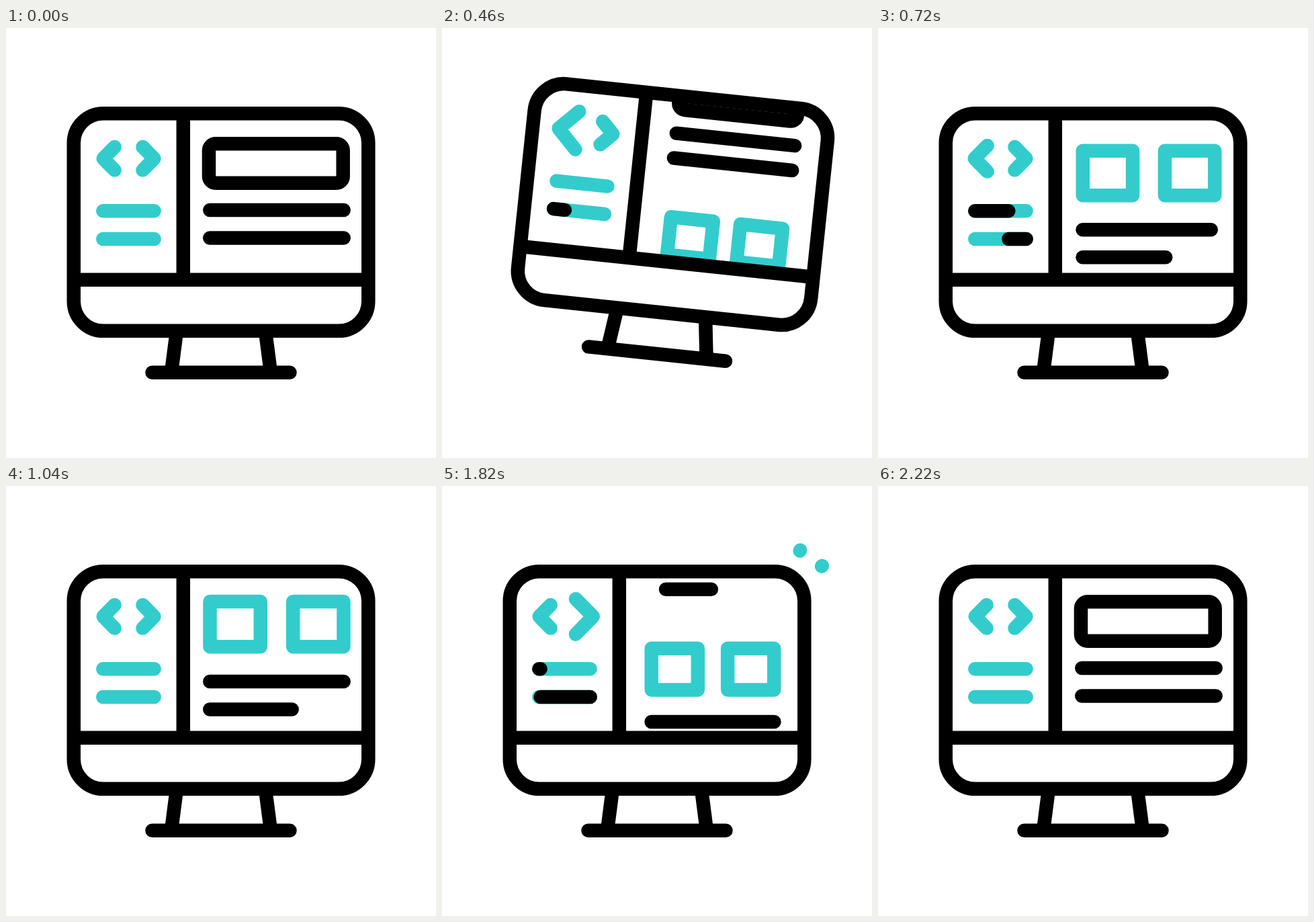
Write an HTML page with a canvas that moves like this. It is 640x640 px and loops after 2.4 s.

```html
<!DOCTYPE html>
<html lang="en">
<head>
<meta charset="utf-8">
<style>
  html, body { margin: 0; width: 100%; height: 100%; overflow: hidden; background: #fff; }
  canvas { display: block; width: 100vw; height: 100vh; object-fit: contain; }
</style>
</head>
<body>
<canvas width="640" height="640"></canvas>
<script>
const ctx = document.querySelector('canvas').getContext('2d');
const LOOP = 2400, BLACK = '#000', TEAL = '#33cccc';

const mix = (a, b, k) => a + (b - a) * k;

// Smooth step from 0 to 1 between two times
function ease(t, from, to) {
  const u = Math.min(1, Math.max(0, (t - from) / (to - from)));
  return u * u * (3 - 2 * u);
}

// Rise to 1 in the middle of the interval, then back to 0
function pulse(t, from, to) {
  const mid = (from + to) / 2;
  return ease(t, from, mid) - ease(t, mid, to);
}

function stroke(color, points, closed) {
  ctx.strokeStyle = color;
  ctx.beginPath();
  points.forEach(([x, y]) => ctx.lineTo(x, y));
  if (closed) ctx.closePath();
  ctx.stroke();
}

function roundRect(x, y, w, h, r) {
  ctx.strokeStyle = BLACK;
  ctx.beginPath();
  ctx.roundRect(x, y, w, h, r);
  ctx.stroke();
}

// Part of a line that grows from its start, then leaves through its end
function sweep(t, start, color, [x1, y1], [x2, y2]) {
  if (t <= start || t >= start + 400) return;
  const at = k => [mix(x1, x2, k), mix(y1, y2, k)];
  stroke(color, [at(ease(t, start + 200, start + 400)), at(ease(t, start, start + 200))]);
}

function bar(t, y, starts) {
  stroke(TEAL, [[144.3, y], [220.7, y]]);
  starts.forEach(s => sweep(t, s, BLACK, [144.3, y], [220.7, y]));
}

function chevron(cx, dir, k) {
  const x = d => cx + dir * d * k, h = 17.3 * k;
  stroke(TEAL, [[x(-8.7), 194.3 - h], [x(8.3), 194.3], [x(-8.7), 194.3 + h]]);
}

// Both pages shrink with distance while their strokes keep their width
function page(offset, cy) {
  const s = 1 - Math.abs(offset) / 765;
  return [x => 403 + (x - 403) * s, y => cy + offset + (y - cy) * s];
}

function articlePage(t, scroll) {
  const [X, Y] = page(-210 * scroll, 242);
  const grown = t < 1600 ? 1 : ease(t, 1600, 2050);
  const left = X(302), top = Y(172.2);
  roundRect(left, top, X(501.7) - left, Y(230.8) - top, 10);
  stroke(BLACK, [[X(303.3), Y(271)], [X(502.7), Y(271)]]);
  const from = mix(303.3, 502.7, 0.13 * (1 - grown));
  stroke(BLACK, [[X(from), Y(312.6)], [X(mix(303.3, 502.7, grown)), Y(312.6)]]);
}

function cardsPage(t, scroll) {
  const [X, Y] = page(206 * (1 - scroll), 252);
  const wobble = pulse(t, 640, 1040);
  for (const [a, b] of [[303.5, 378.8], [427.2, 502.5]]) {
    stroke(TEAL, [[X(a), Y(172)], [X(b), Y(172)], [X(b), Y(239.3)], [X(a), Y(239.3)]], true);
  }
  stroke(BLACK, [[X(303.3), Y(291)], [X(502.7 - 16 * wobble), Y(291)]]);
  stroke(BLACK, [[X(303.3), Y(332.6)], [X(425.7 + 8 * wobble), Y(332.6)]]);
}

function draw(t) {
  ctx.fillStyle = '#fff';
  ctx.fillRect(0, 0, 640, 640);
  ctx.lineWidth = 20.5;
  ctx.lineCap = ctx.lineJoin = 'round';
  ctx.save();

  const hop = pulse(t, 200, 600);
  ctx.translate(320, 513 - 35.6 * hop);
  ctx.rotate(7.7 * hop * Math.PI / 180);
  ctx.translate(-320, -513);

  const scroll = ease(t, 200, 800) - ease(t, 1600, 2200);
  ctx.save();
  ctx.beginPath();
  ctx.rect(264, 127, 275, 248);
  ctx.clip();
  if (scroll < 1) articlePage(t, scroll);
  if (scroll > 0) cardsPage(t, scroll);
  ctx.restore();

  chevron(153, -1, 1 + 0.67 * pulse(t, 200, 800));
  chevron(212.2, 1, 1 + 0.63 * pulse(t, 1600, 2200));
  bar(t, 272.3, [600, 1800]);
  bar(t, 314, [400, 1600]);

  // Monitor
  roundRect(100.8, 127.2, 438.5, 323.6, 44);
  ctx.lineCap = 'butt';
  stroke(BLACK, [[263.8, 127], [263.8, 375]]);
  stroke(BLACK, [[101, 374.8], [539, 374.8]]);
  stroke(BLACK, [[254, 451], [246, 513]]);
  stroke(BLACK, [[386, 451], [394, 513]]);
  ctx.lineCap = 'round';
  stroke(BLACK, [[217.5, 512.8], [422.5, 512.8]]);
  ctx.restore();

  sweep(t, 1800, TEAL, [532.7, 96.5], [548.5, 64.5]);
  sweep(t, 1800, TEAL, [565, 119.5], [593, 98]);
}

function tick() {
  draw(performance.now() % LOOP);
  requestAnimationFrame(tick);
}
tick();
</script>
</body>
</html>
```
